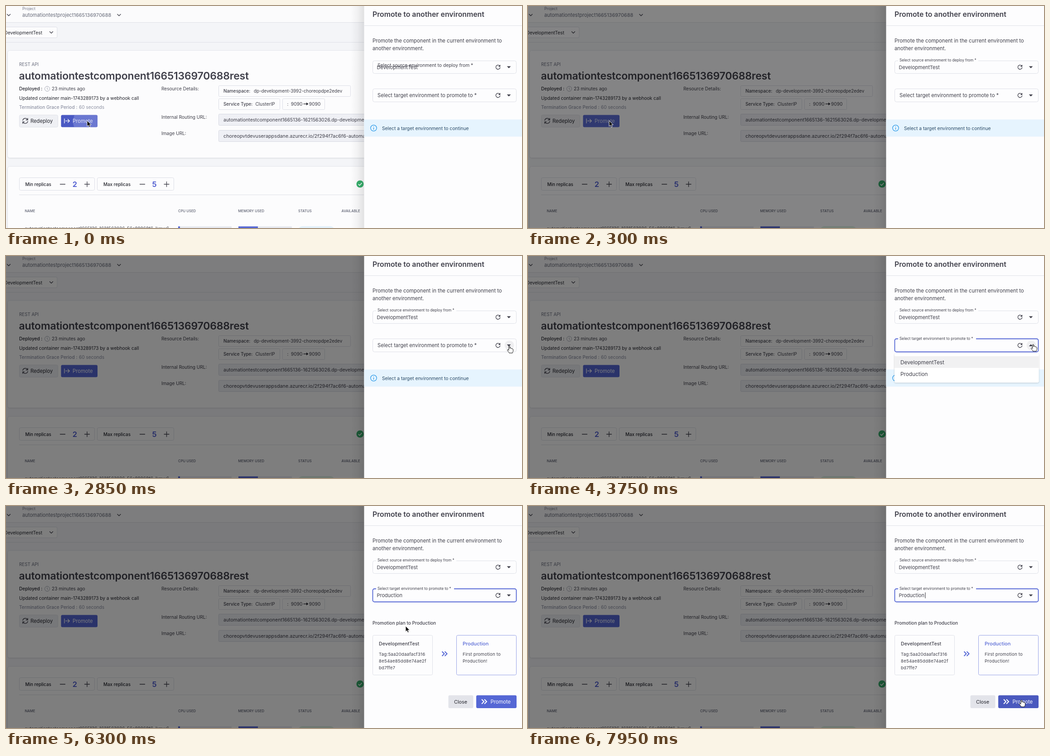
These frames come from a looping animation (1139x492 px, 8 s). An HTML page:

```html
<!DOCTYPE html>
<html lang="en">
<head>
<meta charset="utf-8">
<title>Promote to another environment</title>
<style>
html, body { margin: 0; width: 100%; height: 100%; overflow: hidden; background: #f5f6f9; }
svg { display: block; width: 100%; height: 100%; }
text { font: 10.1px Inter, "Open Sans", sans-serif; font-optical-sizing: none; fill: #40404b; white-space: pre; }
.m { font-weight: 500; }
.b { font-weight: 600; }
.dark { fill: #24252d; }
.dim { fill: #8d91a3; }
.head { font-size: 7.7px; font-weight: 500; fill: #5b5f70; }
.field { font-size: 11px; }
.body { font-size: 11.28px; }
.opt { font-size: 11.8px; }
.note { font-size: 9.6px; letter-spacing: .22px; }
.btn { font-size: 11.2px; }
.white { fill: #fff; }
.blue { fill: #5567d5; }
.card { fill: #fdfdfe; stroke: #e6e8ed; }
.chip { fill: #fdfdfe; stroke: #dddfe7; }
.fill { fill: #f0f1f6; stroke: #d8dae3; }
.box { fill: none; stroke: #dfe1e8; }
.line { fill: none; stroke: #40404b; stroke-width: 1.3; stroke-linecap: round; stroke-linejoin: round; }
.rule { stroke: #dfe1e8; }
</style>
</head>
<body>
<svg viewBox="0 0 1139 492" preserveAspectRatio="none">
  <defs>
    <linearGradient id="shade"><stop offset="0" stop-opacity="0"/><stop offset=".5" stop-opacity=".04"/><stop offset="1" stop-opacity=".11"/></linearGradient>
    <filter id="faint" x="-2%" y="-5%" width="104%" height="112%"><feDropShadow dx="0" dy="1" stdDeviation="1" flood-opacity=".09"/></filter>
    <filter id="soft" x="-10%" y="-20%" width="120%" height="150%"><feDropShadow dx="0" dy="1" stdDeviation="1.5" flood-opacity=".22"/></filter>
    <clipPath id="btnClip"><rect x="122" y="242" width="80" height="26" rx="3"/></clipPath>
    <path id="chev" class="line" d="M-3.5-1.7 0 1.8 3.5-1.7"/>
    <g id="reload"><path class="line" d="M3.6-3A4.7 4.7 0 1 0 4.6 1"/><path fill="#40404b" d="M5.2-5.6V-.9H.5Z"/></g>
    <path id="tri" fill="#40404b" d="M-4.3-2H4.3L0 2.4Z"/>
    <path id="minus" class="line" d="M-5.5 0H5.5"/>
    <path id="plus" class="line" d="M-5.5 0H5.5M0-5.5V5.5"/>
    <path id="ahead" d="M-5-5 0 0-5 5M1-5 6 0 1 5" fill="none" stroke-width="2"/>
  </defs>

  <!-- page -->
  <rect width="1139" height="492" fill="#f5f6f9"/>
  <rect width="1139" height="36" fill="#fcfcfd"/>
  <path class="rule" d="M0 36.5H790M0 80.5H790"/>
  <use href="#chev" x="6" y="20"/><use href="#chev" x="249.5" y="20"/>
  <text x="36" y="9" style="font-size:8.7px;fill:#777b8c">Project</text>
  <text x="36" y="23.5" class="field" style="fill:#676b7a">automationtestproject1665136970688</text>
  <rect class="chip" x="-10" y="46.5" width="123" height="24" rx="3"/>
  <text x="80" y="62.5" text-anchor="end" class="dark" style="font-size:10.2px">DevelopmentTest</text>
  <use href="#chev" x="100" y="58.5"/>

  <rect class="card" x="3.5" y="98.5" width="820" height="238" rx="5" filter="url(#faint)"/>
  <text x="29" y="133" style="font-size:9.8px;fill:#6c7080">REST API</text>
  <text x="28.5" y="162.5" class="b" style="font-size:23px;letter-spacing:-.2px">automationtestcomponent1665136970688rest</text>
  <text x="29" y="187" class="m dark">Deployed :</text>
  <g fill="none" stroke="#a5a8b5"><circle cx="91" cy="183.5" r="5.5"/><path d="M91 180.5V184l2 1.5"/></g>
  <text x="101" y="187">23 minutes ago</text>
  <text x="29" y="207.5" class="dark">Updated container main-1743289173 by a webhook call</text>
  <text x="29" y="228" class="m dim">Termination Grace Period :</text>
  <text x="161" y="228" class="dim">60 seconds</text>
  <rect x="29.5" y="241.5" width="85" height="27" rx="3" fill="#f0f1f5" stroke="#e2e4ea"/>
  <path class="line" d="M37 253.5a5.6 5.6 0 0 1 10.5-1.5M48 248.800v3.7h-3.7M48 255.700a5.6 5.6 0 0 1-10.5 1.5M37 260.400v-3.7h3.7"/>
  <text x="54" y="259" class="btn dark">Redeploy</text>
  <rect id="promote" x="121.5" y="241.5" width="80.5" height="27" rx="3"/>
  <g clip-path="url(#btnClip)"><circle id="ripple" cx="181" cy="256" fill="#8792de"/></g>
  <path class="line" style="stroke:#fff" d="M129 250v9.5M131.5 254.700H140M136.5 251l3.7 3.7-3.7 3.7"/>
  <text x="147" y="259" class="btn white" id="promoteText">Promote</text>

  <text x="343" y="187">Resource Details:</text>
  <text x="343" y="250">Internal Routing URL:</text>
  <text x="343" y="286">Image URL:</text>
  <rect class="chip" x="469.5" y="176.5" width="291" height="24" rx="2"/>
  <text x="480" y="192" class="m" style="font-size:9.9px">Namespace:</text>
  <text x="547" y="192" style="font-size:9.85px">dp-development-3992-choreopdpe2edev</text>
  <rect class="chip" x="469.5" y="205.5" width="135" height="24" rx="2"/>
  <text x="480" y="220.5" class="m" style="font-size:9.8px">Service Type:</text>
  <text x="550.5" y="220.5">ClusterIP</text>
  <rect class="chip" x="610.5" y="205.5" width="93" height="24" rx="2"/>
  <text x="620.5" y="220.5">:</text><text x="629" y="220.5">9090</text><text x="669" y="220.5">9090</text>
  <path d="M656.5 217H664" stroke="#24252d" stroke-width="1.3"/><path d="M663 213.800 667.5 217 663 220.200Z" fill="#24252d"/>
  <rect class="fill" x="469.5" y="239.5" width="340" height="25" rx="2"/>
  <text x="480" y="256" style="font-size:10.5px">automationtestcomponent1665136-1621563026.dp-development</text>
  <rect class="fill" x="469.5" y="275.5" width="340" height="25" rx="2"/>
  <text x="480" y="292" style="font-size:10.8px">choreopvtdevuserappsdane.azurecr.io/2f294f7ac6f6-automation</text>

  <rect class="card" x="3.5" y="355.5" width="820" height="160" rx="5" filter="url(#faint)"/>
  <rect class="chip" x="29.5" y="380.5" width="166" height="28" rx="3"/>
  <rect class="chip" x="201.5" y="380.5" width="169" height="28" rx="3"/>
  <text x="42.5" y="398.5" class="m dark" style="font-size:9.9px">Min replicas</text>
  <text x="215" y="398.5" class="m dark" style="font-size:9.9px">Max replicas</text>
  <use href="#minus" x="125" y="395"/><use href="#plus" x="179" y="395"/>
  <use href="#minus" x="301" y="395"/><use href="#plus" x="354.5" y="395"/>
  <text x="152" y="401" text-anchor="middle" class="b" style="font-size:16.5px;fill:#4a58d0">2</text>
  <text x="327.5" y="401" text-anchor="middle" class="b" style="font-size:16.5px;fill:#4a58d0">5</text>
  <circle cx="781.5" cy="394.5" r="8" fill="#36b06c"/>
  <path d="M777.700 394.700l2.8 2.8 5-5.3" fill="none" stroke="#fff" stroke-width="1.6"/>
  <path class="rule" d="M29 418.5H790"/>
  <text x="41.5" y="456.5" class="head">NAME</text>
  <text x="380" y="456.5" class="head">CPU USED</text>
  <text x="512.5" y="456.5" class="head">MEMORY USED</text>
  <text x="645" y="456.5" class="head">STATUS</text>
  <text x="740.5" y="456.5" class="head">AVAILABLE</text>
  <text x="41.5" y="496.5" style="font-size:9.85px">automationtestcomponent1665136-1621563026-56c88968f6-jkmw6</text>
  <path d="M380 488.5h118v9H380ZM513 488.5h118v9H513Z" fill="#e6e8f0"/>
  <path class="blue" d="M380 488.5h4v9h-4ZM513 488.5h43v9h-43Z"/>
  <rect id="status" x="645" y="488" width="80" height="20" rx="9"/>

  <rect id="dim" width="1139" height="492" opacity="0"/>

  <!-- drawer -->
  <rect x="761" width="30" height="492" fill="url(#shade)"/>
  <rect x="790.5" width="349" height="492" fill="#fdfdfe"/>
  <path class="rule" d="M791 43.5H1139"/>
  <text x="809" y="23.5" class="b" style="font-size:15.8px">Promote to another environment</text>
  <text x="809" y="81" class="body">Promote the component in the current environment to</text>
  <text x="809" y="97.5" class="body">another environment.</text>

  <rect class="box" x="809.5" y="121.5" width="317" height="28" rx="4"/>
  <path id="notch1" d="M817 121.5H994" stroke="#fdfdfe" stroke-width="3"/>
  <text x="818.5" y="140" class="field">DevelopmentTest</text>
  <text id="label1" x="820">Select source environment to deploy from *</text>
  <use href="#reload" x="1086" y="135.5"/><use href="#tri" x="1110" y="135.5"/>

  <g id="banner">
    <rect x="790.5" y="251.5" width="349" height="38" fill="#e6f4fe"/>
    <g fill="none" stroke="#2f9be8" stroke-width="1.3"><circle cx="811.5" cy="270.5" r="6.7"/><path d="M811.5 269.5v4.5M811.5 266.700v1.4"/></g>
    <text x="830" y="274.5" style="font-size:10.3px;fill:#2a4a66">Select a target environment to continue</text>
  </g>

  <rect class="box" id="box2" x="809.5" y="183.5" width="317" height="29" rx="4"/>
  <path id="notch2" d="M817 183.5H989" stroke="#fdfdfe" stroke-width="3"/>
  <text id="label2" x="820">Select target environment to promote to *</text>
  <text id="choice" x="818.5" y="202" class="field">Production</text>
  <path id="caret" d="M0 191.5V204.5" stroke="#24252d"/>
  <circle id="halo" cx="1111" cy="198" r="10.5" fill="#efeff1"/>
  <use href="#reload" x="1086" y="198"/>
  <g id="arrow2"><use href="#tri"/></g>

  <g id="menu">
    <rect x="809" y="216" width="318.5" height="64.5" rx="3" fill="#fff" filter="url(#soft)"/>
    <rect id="hover" x="809" width="318.5" height="26" fill="#f1f1f2"/>
    <text x="822" y="239.5" class="opt">DevelopmentTest</text>
    <text x="822" y="266" class="opt">Production</text>
  </g>

  <g id="plan">
    <text x="809" y="263" class="m">Promotion plan to Production</text>
    <rect class="box" x="809.5" y="286.5" width="132" height="88" rx="3"/>
    <text x="823" y="309" class="m" style="font-size:10.7px">DevelopmentTest</text>
    <text x="823" y="331.5" class="note">Tag:5aa20daafacf316</text>
    <text x="823" y="347" class="note">8e54ae85dd8e74ae2f</text>
    <text x="823" y="362" class="note">bd7ffe7</text>
    <use href="#ahead" x="967.5" y="327.5" stroke="#5567d5"/>
    <rect class="box" x="994.5" y="286.5" width="132" height="88" rx="3" style="stroke:#98a3e6"/>
    <text x="1008" y="309" class="m blue field">Production</text>
    <text x="1008" y="331.5" class="note">First promotion to</text>
    <text x="1008" y="347" class="note">Production!</text>
    <rect x="976.5" y="419.5" width="55" height="28.5" rx="3" fill="#e3e4ea"/>
    <text x="989" y="438" class="dark" style="font-size:10.9px">Close</text>
    <rect id="confirm" x="1038" y="419.5" width="89" height="28.5" rx="3"/>
    <use href="#ahead" x="1055" y="433.5" stroke="#fff"/>
    <text x="1069.5" y="438" class="btn white">Promote</text>
  </g>

  <path id="pointer" d="M0 0V12.600L2.9 10 4.9 14.600 7.2 13.600 5.2 9.200H9.200Z" fill="#111" stroke="#fff" stroke-width=".9"/>
  <path id="hand" d="M-1.2.8C-1.2-.5 1.2-.5 1.2.8V5C2-.2 2 4 3.3 4.2 3.8 4.3 4 4.8 4 5.3 5 4.5 6.2 4.8 6.3 6 7.3 5.5 8.4 6 8.4 7.2V10.500C8.4 12.3 7.2 13 7 15H-.3C-.6 13.2-3.6 11.2-4.4 8.7-4.6 7.3-3 7-2.2 8L-1.2 9.200Z" fill="#fff" stroke="#111" stroke-linejoin="round"/>
</svg>
<script>
const LOOP = 8000, STEP = 150;
const $ = id => document.getElementById(id);
const set = (id, attrs) => { for (const k in attrs) $(id).setAttribute(k, attrs[k]); };
const show = (id, on) => set(id, { visibility: on ? 'visible' : 'hidden' });

// time, x, y of the cursor tip
const path = [
  [600, 179, 254], [750, 250, 250], [900, 480, 213], [1050, 675, 222], [1200, 675, 222],
  [1350, 810, 262], [1500, 1000, 264], [1650, 1075, 241], [1950, 1081, 234], [2250, 1080, 230],
  [2550, 1096, 214], [2850, 1111, 200], [3300, 1115, 196], [3750, 1115, 196],
  [4050, 1060, 218], [4350, 940, 260], [4650, 888, 276], [5250, 882, 266], [6300, 882, 266],
  [6600, 935, 325], [6900, 1052, 418], [7200, 1088, 429], [7500, 1088, 429], [7800, 1086, 428], [7950, 1089, 430]
];
// caret visible between these times
const blinks = [[3300, 3450], [3900, 4350], [4800, 5250], [6750, 7200], [7650, 8000]];

function cursorAt(t) {
  if (t <= path[0][0]) return path[0].slice(1);
  const i = path.findIndex(p => p[0] >= t);
  const [a, b] = [path[i - 1], path[i]];
  const k = (t - a[0]) / (b[0] - a[0]);
  return [a[1] + (b[1] - a[1]) * k, a[2] + (b[2] - a[2]) * k];
}

function label(id, size, y) {
  $(id).style.fontSize = size + 'px';
  set(id, { y });
}

function draw(now) {
  const t = Math.floor(now % LOOP / STEP) * STEP;
  const phase = Math.min(t / STEP, 3);

  set('dim', { opacity: [.005, .1, .48, .5][phase] });
  set('status', { fill: phase ? '#def0e4' : '#e4f2fb' });
  set('promote', { fill: t < 300 ? '#4a59c4' : '#5567d5' });
  set('ripple', { r: [33, 41, 62, 0][phase], opacity: [.55, .5, .12, 0][phase] });
  set('promoteText', { opacity: t < 750 ? .8 : 1 });
  label('label1', [10.27, 9.4, 8.25][Math.min(phase, 2)], [135, 130, 123][Math.min(phase, 2)]);
  show('notch1', t >= 150);

  const focus = t >= 3300, open = focus && t < 5550, chosen = t >= 5550, planned = t >= 6300;
  set('box2', { style: focus ? 'stroke:#5567d5;stroke-width:1.8' : '' });
  if (t < 3300) label('label2', 11.2, 202);
  else if (t < 3450) label('label2', 9.3, 192);
  else label('label2', 8.3, 185.5);
  show('notch2', focus);
  show('choice', chosen);
  show('caret', blinks.some(([a, b]) => t >= a && t < b));
  set('caret', { transform: `translate(${chosen ? 877 : 819.5})` });
  show('halo', t >= 2850 && t < 4050);
  set('arrow2', { transform: `translate(1110 198) scale(1 ${open ? -1 : 1})` });
  show('menu', open);
  set('hover', { y: t < 4350 ? 222 : 248.5 });
  show('banner', !planned);
  show('plan', planned);
  set('confirm', { fill: t >= 6900 ? '#4a59be' : '#5567d5' });

  const hand = t >= 2850 && t < 5550 || t >= 7050;
  const at = { transform: `translate(${cursorAt(t)})` };
  set('pointer', at);
  set('hand', at);
  show('pointer', !hand);
  show('hand', hand);
}

const start = performance.now();
function tick() {
  draw(performance.now() - start);
  requestAnimationFrame(tick);
}
tick();
</script>
</body>
</html>
```
